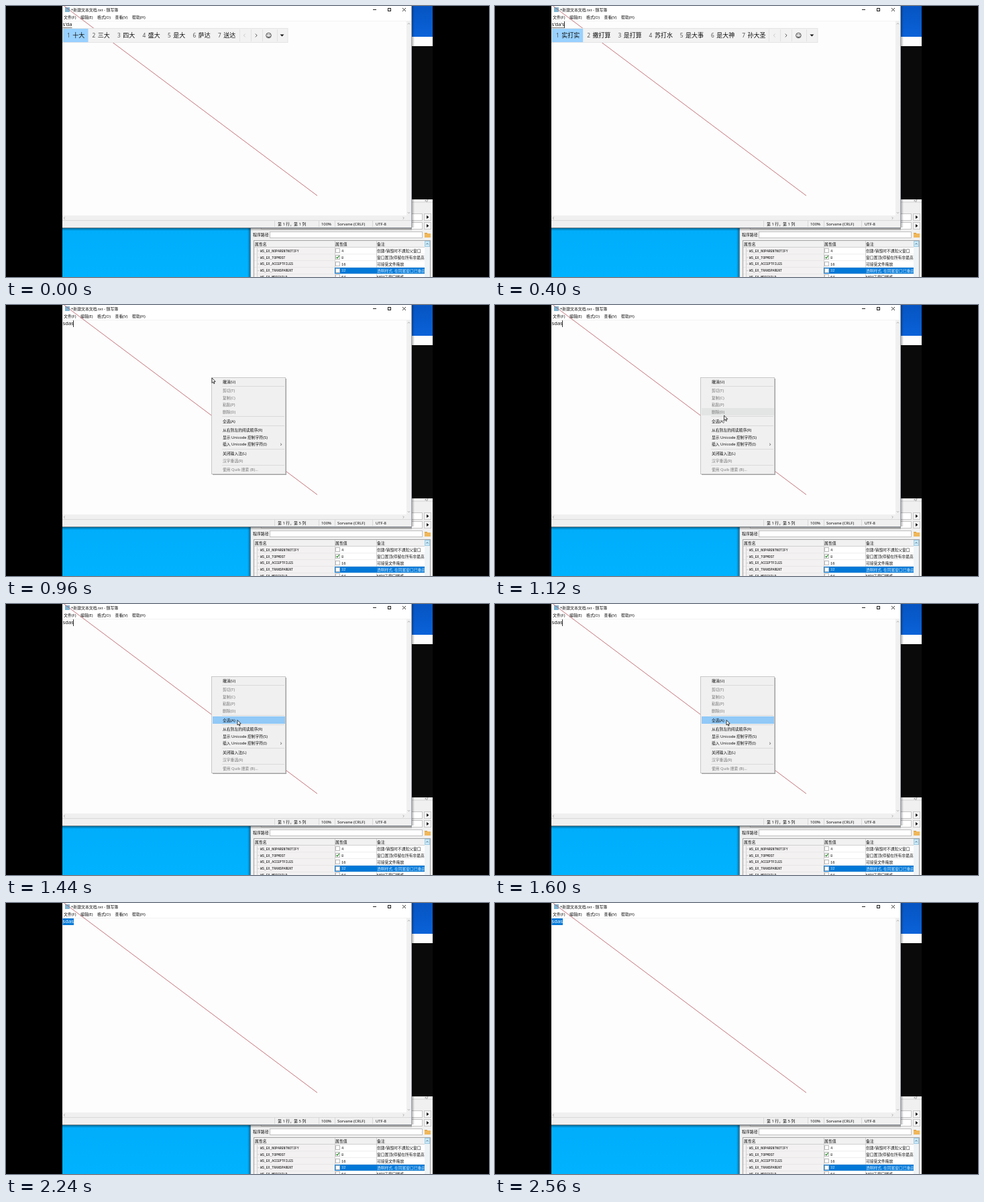
Write an HTML page with a canvas that moves like this. It is 720 px wide and 405 px high and loops after 2.64 s.

```html
<!DOCTYPE html>
<html lang="zh-CN">
<head>
<meta charset="utf-8">
<style>
html, body { margin: 0; width: 100%; height: 100%; overflow: hidden; background: #000; }
canvas { display: block; }
</style>
</head>
<body>
<canvas id="stage" width="720" height="405"></canvas>
<script>
const ctx = document.getElementById('stage').getContext('2d');
const LOOP = 2640, STEP = 80;
const COMMIT = 640, MENU_OPEN = 960, MENU_CLOSE = 1680, THIRD_KEY = 240;
const UI = '"Noto Sans", "Noto Sans CJK SC", sans-serif';
const MONO = '"Liberation Mono", "Noto Sans CJK SC", monospace';
const BLUE = '#0078d7';

function rect(x, y, w, h, fill) {
  ctx.fillStyle = fill;
  ctx.fillRect(x, y, w, h);
}

function box(x, y, w, h, fill, stroke) {
  rect(x, y, w, h, stroke);
  rect(x + 1, y + 1, w - 2, h - 2, fill);
}

function gradient(x, y, w, h, from, to, horizontal) {
  const g = ctx.createLinearGradient(x, y, horizontal ? x + w : x, horizontal ? y : y + h);
  g.addColorStop(0, from);
  g.addColorStop(1, to);
  rect(x, y, w, h, g);
}

// y is the vertical centre of the text
function text(s, x, y, size = 6, color = '#111', font = UI) {
  ctx.font = `${size}px ${font}`;
  ctx.fillStyle = color;
  ctx.fillText(s, x, y + size * 0.36);
  return ctx.measureText(s).width;
}

function path(points, color, width = 1) {
  ctx.strokeStyle = color;
  ctx.lineWidth = width;
  ctx.beginPath();
  points.forEach(([x, y]) => ctx.lineTo(x, y));
  ctx.stroke();
}

function shape(points, fill) {
  ctx.fillStyle = fill;
  ctx.beginPath();
  points.forEach(([x, y]) => ctx.lineTo(x, y));
  ctx.closePath();
  ctx.fill();
}

// dx, dy give the pointing direction
function chevron(x, y, dx, dy, size, color) {
  path([[x - dx * size / 2 - dy * size, y - dy * size / 2 - dx * size],
        [x + dx * size / 2, y + dy * size / 2],
        [x - dx * size / 2 + dy * size, y - dy * size / 2 + dx * size]], color, 0.8);
}

function desktop() {
  rect(0, 0, 720, 405, '#000');
  gradient(84, 331, 281, 74, '#00adfb', '#00b3ff');
  gradient(604, 0, 32, 46, '#0654c2', '#0a62d8');
  rect(604, 46, 32, 14, '#fdfdfd');
  rect(604, 60, 32, 229, '#0a0a0a');
}

const styles = [
  ['WS_EX_NOPARENTNOTIFY', 4, '创建/销毁时不通知父窗口'],
  ['WS_EX_TOPMOST', 8, '窗口置顶(停留在所有非最高'],
  ['WS_EX_ACCEPTFILES', 16, '可接受文件拖放'],
  ['WS_EX_TRANSPARENT', 32, '透明样式, 在同属窗口已重画'],
  ['WS_EX_MDICHILD', 64, 'MDI子窗口样式'],
];

function inspector() {
  gradient(360, 331, 4, 74, 'rgba(0,40,70,0)', 'rgba(0,40,70,.45)', true);
  rect(364, 289, 272, 116, '#f0f0f0');
  rect(364, 331, 1, 74, '#6f8796');
  rect(604, 293, 32, 1, '#dcdcdc');
  text('</', 624, 291, 5.5, '#444');
  for (const y of [310, 323]) {
    box(380, y, 241, 11, '#fff', '#c4c4c4');
    box(623, y, 11, 11, '#f4f4f4', '#c8c8c8');
    shape([[627, y + 3], [630.5, y + 5.5], [627, y + 8]], '#111');
  }
  text('程序路径', 368, 342, 5.9);
  box(393, 337, 228, 10, '#fff', '#c0c0c0');
  rect(624, 339, 4, 2, '#d99a32');
  rect(624, 340, 9, 6, '#f0b75a');

  box(369, 350, 264, 60, '#fff', '#a4a4a4');
  rect(370, 351, 254, 10, '#f1f1f1');
  rect(370, 361, 120, 44, '#f3f1f1');
  rect(370, 360, 254, 1, '#d0d0d0');
  [['属性名', 371], ['属性值', 491], ['备注', 553]].forEach(([s, x]) => text(s, x, 355.7, 5.9));
  rect(490, 351, 1, 54, '#cfcfcf');
  rect(552, 351, 1, 54, '#cfcfcf');
  path([[374.5, 362], [374.5, 405]], '#c4c4c4', 0.7);

  ctx.save();
  ctx.beginPath();
  ctx.rect(370, 361, 254, 44);
  ctx.clip();
  styles.forEach(([name, value, note], i) => {
    const y = 366 + i * 9.85, selected = value === 32;
    const ink = selected ? '#dcefff' : '#111';
    rect(370, y + 4.6, 254, 0.6, '#e0e0e0');
    if (selected) rect(490, 391, 134, 9, BLUE);
    path([[374.5, y], [378, y]], '#c4c4c4', 0.7);
    text(name, 379, y, 4.8, '#000', MONO);
    box(491, Math.round(y) - 4, 7, 7, '#fff', '#b8b8b8');
    if (value === 8) path([[492.5, y - 0.5], [494, y + 1], [496.5, y - 2.5]], '#218a21', 1.1);
    text(value, 500, y, 5.4, ink, MONO);
    text(note, 553, y, 5.75, ink);
  });
  ctx.restore();
  rect(624, 351, 8, 54, '#eef3f6');
  box(624, 351, 8, 9, '#c9e8f8', '#9fcbe2');
  chevron(628, 355.5, 0, -1, 1.6, '#356');
}

function editor(column) {
  gradient(84, 331, 521, 5, 'rgba(0,0,0,.5)', 'rgba(0,0,0,0)');
  gradient(605, 0, 4, 331, 'rgba(0,0,0,.3)', 'rgba(0,0,0,0)', true);
  rect(84, 0, 521, 331, '#fdfdfd');
  rect(84, 0, 521, 22, '#fff');
  rect(84, 22, 514, 1, '#f2f2f2');
  rect(88, 2, 7, 7, '#7fb4cf');
  text('*新建文本文档.txt - 随写簿', 97, 5.5, 5.9);
  [['文件(F)', 86], ['编辑(E)', 111], ['格式(O)', 136], ['查看(V)', 162.5], ['帮助(H)', 188]]
    .forEach(([s, x]) => text(s, x, 17.3, 5.9));
  path([[547, 5.5], [552, 5.5]], '#222');
  ctx.strokeRect(569.5, 3.5, 4, 4);
  path([[591, 3], [596, 8]], '#222', 0.9);
  path([[596, 3], [591, 8]], '#222', 0.9);

  rect(597, 22, 7, 292, '#f0f0f0');
  rect(84, 313, 520, 7, '#f0f0f0');
  chevron(600.5, 26.5, 0, -1, 1.6, '#999');
  chevron(600.5, 309, 0, 1, 1.6, '#999');
  chevron(87, 317, -1, 0, 1.6, '#999');
  chevron(592.5, 317, 1, 0, 1.6, '#999');

  rect(84, 320, 520, 11, '#f0f0f0');
  rect(84, 320, 520, 1, '#dadada');
  for (const x of [400, 466, 490, 546]) rect(x, 321, 1, 9, '#d8d8d8');
  [[`第 1 行，第 ${column} 列`, 405], ['100%', 470], ['Sorvane (CRLF)', 494], ['UTF-8', 551]]
    .forEach(([s, x]) => text(s, x, 326, 5.9));
  rect(84, 331, 521, 1, '#848c92');
  rect(604, 0, 1, 331, '#a4a8ac');
}

function note(content, composing, caret, selected) {
  if (selected) rect(84.5, 23, 16.5, 10, BLUE);
  const width = text(content, 84.5, 27.7, 7.7, selected ? '#fff' : '#111');
  if (composing) rect(84.5, 32, width, 0.8, '#555');
  if (caret) rect(Math.round(84.5 + width - 0.5), 23, 1, 10, '#333');
}

function candidates(words) {
  const pitch = 20.1 + words[0].length * 8.7;
  const end = 85 + pitch * words.length;
  box(84, 33, end - 11, 22, '#f2f2f2', '#e4e4e4');
  rect(85, 34, pitch, 20, '#99d1ff');
  words.forEach((word, i) => {
    const x = 85 + i * pitch;
    text(i + 1, x + 6, 44.2, 8.4, '#555');
    text(word, x + 14.3, 44, 9);
  });
  for (const dx of [0, 17, 34, 56]) rect(Math.round(end + dx), 35, 1, 18, '#e2e2e2');
  chevron(end + 8, 44, -1, 0, 2.4, '#c0c0c0');
  chevron(end + 25.5, 44, 1, 0, 2.4, '#333');
  const cx = end + 44;
  ctx.strokeStyle = '#222';
  ctx.lineWidth = 0.8;
  ctx.beginPath();
  ctx.arc(cx, 44, 3.8, 0, 7);
  ctx.moveTo(cx + 1.9, 45);
  ctx.arc(cx, 44.6, 2, 0.2, Math.PI - 0.2);
  ctx.stroke();
  rect(cx - 1.8, 42.2, 1, 1.2, '#222');
  rect(cx + 0.8, 42.2, 1, 1.2, '#222');
  shape([[end + 61, 42.5], [end + 67, 42.5], [end + 64, 45.5]], '#111');
}

// label, centre y, enabled
const menu = [
  ['撤消(U)', 114.7, 1], ['剪切(T)', 128.3], ['复制(C)', 138.9], ['粘贴(P)', 149.4],
  ['删除(D)', 160], ['全选(A)', 173.7, 1], ['从右到左的阅读顺序(R)', 187.3, 1],
  ['显示 Unicode 控制字符(S)', 197.8, 1], ['插入 Unicode 控制字符(I)', 208.4, 1],
  ['关闭输入法(L)', 222, 1], ['汉字重选(R)', 232.6], ['使用 Quib 搜索 (B)...', 246.2],
];

function contextMenu(pointerY) {
  rect(308, 110, 110, 144, '#a0a0a0');
  box(306, 108, 111, 145, '#f0f0f0', '#c8c8c8');
  for (const y of [121, 166, 180, 215, 239]) rect(322, y, 93, 1, '#dadada');
  for (const [label, y, enabled] of menu) {
    if (Math.abs(pointerY - y) <= 5.5) rect(308, Math.round(y) - 6, 108, 11, enabled ? '#91c9f7' : '#e3e5e5');
    text(label, 323, y, 5.8, enabled ? '#111' : '#777');
  }
  chevron(410, 208.4, 1, 0, 1.6, '#333');
}

function pointer(x, y) {
  const outline = [[0, 0], [0, 7.5], [1.7, 6], [2.9, 8.6], [4, 8.1], [2.9, 5.6], [5.2, 5.4], [0, 0]]
    .map(([dx, dy]) => [x + dx, y + dy]);
  shape(outline, '#fff');
  path(outline, '#111', 0.8);
}

function pointerAt(t) {
  const ease = (start, end) => {
    const k = Math.min(1, Math.max(0, (t - start) / (end - start)));
    return k * (2 - k);
  };
  const arrive = ease(MENU_OPEN, 1120), settle = ease(1120, 1360);
  return [307 + 34.5 * arrive + 3.5 * settle, 109 + 56 * arrive + 8.5 * settle];
}

function draw(t) {
  const composing = t < COMMIT, third = t >= THIRD_KEY, selected = t >= MENU_CLOSE;
  desktop();
  inspector();
  editor(composing ? 1 : 5);
  note(composing ? (third ? "s'da's" : "s'da") : 'sdas', composing, third && !selected, selected);
  path([[86.5, 0], [464, 283.5]], '#b4535c', 0.8);
  if (composing) {
    candidates((third ? '实打实 撒打算 是打算 苏打水 是大事 是大神 孙大圣'
                      : '十大 三大 四大 盛大 是大 萨达 送达').split(' '));
  }
  if (t >= MENU_OPEN && !selected) {
    const [x, y] = pointerAt(t);
    contextMenu(y);
    pointer(x, y);
  }
}

function tick(now) {
  const t = now % LOOP;
  draw(t - t % STEP);
  requestAnimationFrame(tick);
}
requestAnimationFrame(tick);
</script>
</body>
</html>
```
